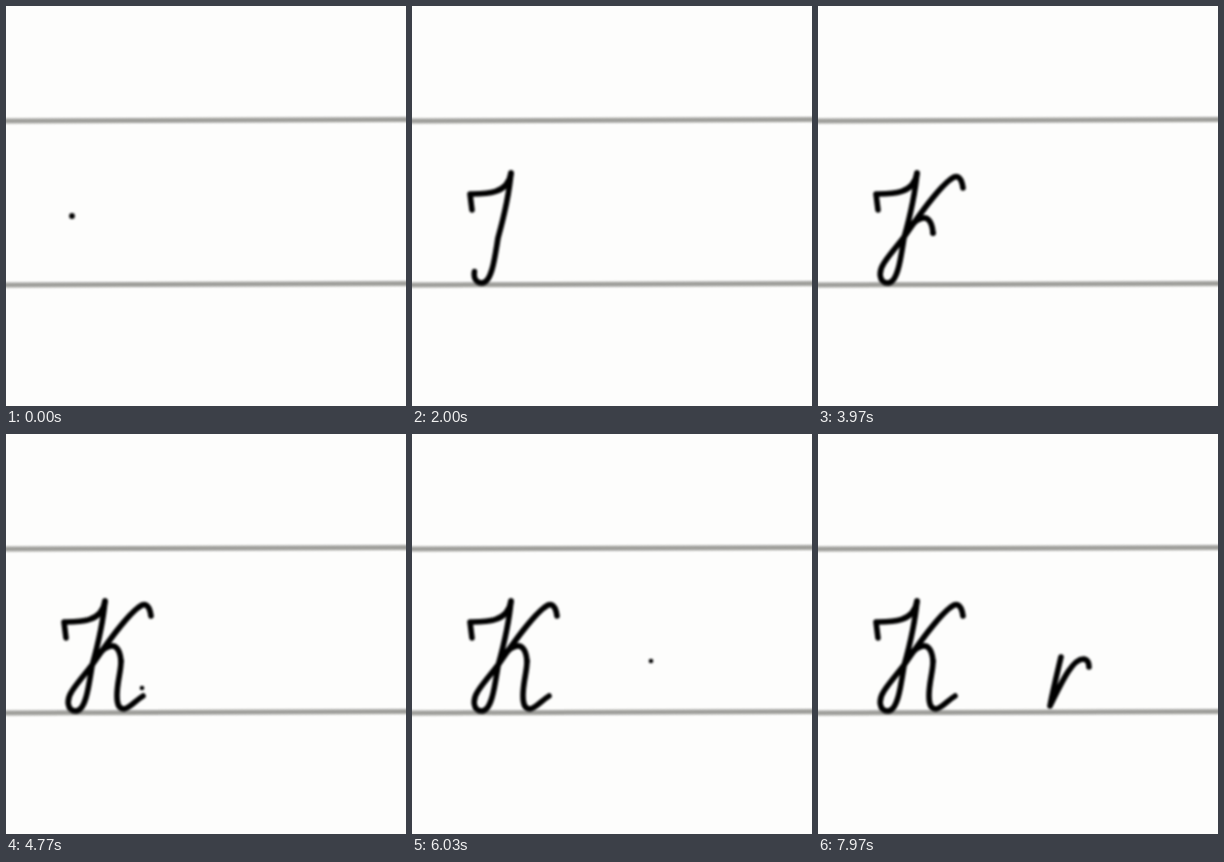
An HTML page that plays this animation: 400 px wide and 400 px high, repeating every 8 s.

```html
<!DOCTYPE html>
<html lang="en">
<head>
<meta charset="utf-8">
<title>Handwriting</title>
<style>
  html, body { margin: 0; width: 100%; height: 100%; overflow: hidden; background: #fdfdfc; }
  svg { display: block; width: 100%; height: 100%; fill: none; stroke-linecap: round; stroke-linejoin: round; }
  #rules { stroke: #9f9f9b; stroke-width: 5; filter: blur(1.2px); }
  #inks { stroke: #000; stroke-width: 5.6; filter: blur(.9px); }
  #pen { fill: #000; filter: blur(.9px); }
</style>
</head>
<body>
<svg viewBox="0 0 400 400">
  <g id="rules"></g>
  <g id="inks"></g>
  <circle id="pen"/>
</svg>
<script>
const LOOP = 8000;

// Pen-down movements: [start ms, end ms, path]
const strokes = [
  [250, 1150, 'M60 204L58 188C72 188 96 189 99 167'],
  [1180, 2730, 'M99 167C97 190 91 214 86 232C83 250 80 277 70 277C61 277 60 266 66 257C72 248 80 239 86 231C100 211 120 182 133 173'],
  [2730, 3000, 'M133 173C137 169.5 143 168 145 182'],
  [3500, 3970, 'M87 229C96 212 113 202 115 227'],
  [3970, 4670, 'M115 227C115 238 111 248 111 262C111 271 114 275 118 275C124 274 129 267 137 262'],
  [6180, 7900, 'M243 223C239 240 235 256 232 272C242 252 254 224 266 225C270 226 271 229 271 233']
];

// Pen-up movements: [start ms, end ms, from, to, radius]
const hovers = [
  [0, 250, [66, 210], [60, 204], 2.9],
  [3000, 3500, [145, 182], [87, 229], 2.3],
  [4670, 4770, [137, 262], [136, 254], 2.3],
  [4770, 6030, [136, 254], [239, 227], 2.3],
  [6030, 6180, [239, 227], [243, 223], 2.3]
];

const byId = id => document.getElementById(id);
const pen = byId('pen');

function addPath(parent, d) {
  const path = document.createElementNS('http://www.w3.org/2000/svg', 'path');
  path.setAttribute('d', d);
  return byId(parent).appendChild(path);
}

for (const y of [115, 279]) addPath('rules', `M-9 ${y}L409 ${y - 1.4}`);

const drawn = strokes.map(([start, end, d]) => {
  const path = addPath('inks', d);
  return { start, end, path, length: path.getTotalLength() };
});

const progress = (t, start, end) => Math.min(1, Math.max(0, (t - start) / (end - start)));
const smooth = p => p * p * (3 - 2 * p);

function render(t) {
  for (const { start, end, path, length } of drawn) {
    path.style.display = t >= start ? '' : 'none';
    path.style.strokeDasharray = `${length * progress(t, start, end)} ${length + 20}`;
  }
  const move = hovers.find(([start, end]) => t >= start && t < end);
  pen.style.display = move ? '' : 'none';
  if (move) {
    const [start, end, from, to, radius] = move;
    const p = smooth(progress(t, start, end));
    pen.setAttribute('cx', from[0] + (to[0] - from[0]) * p);
    pen.setAttribute('cy', from[1] + (to[1] - from[1]) * p);
    pen.setAttribute('r', radius);
  }
}

const origin = performance.now();
function tick() {
  render((performance.now() - origin) % LOOP);
  requestAnimationFrame(tick);
}
tick();
</script>
</body>
</html>
```
